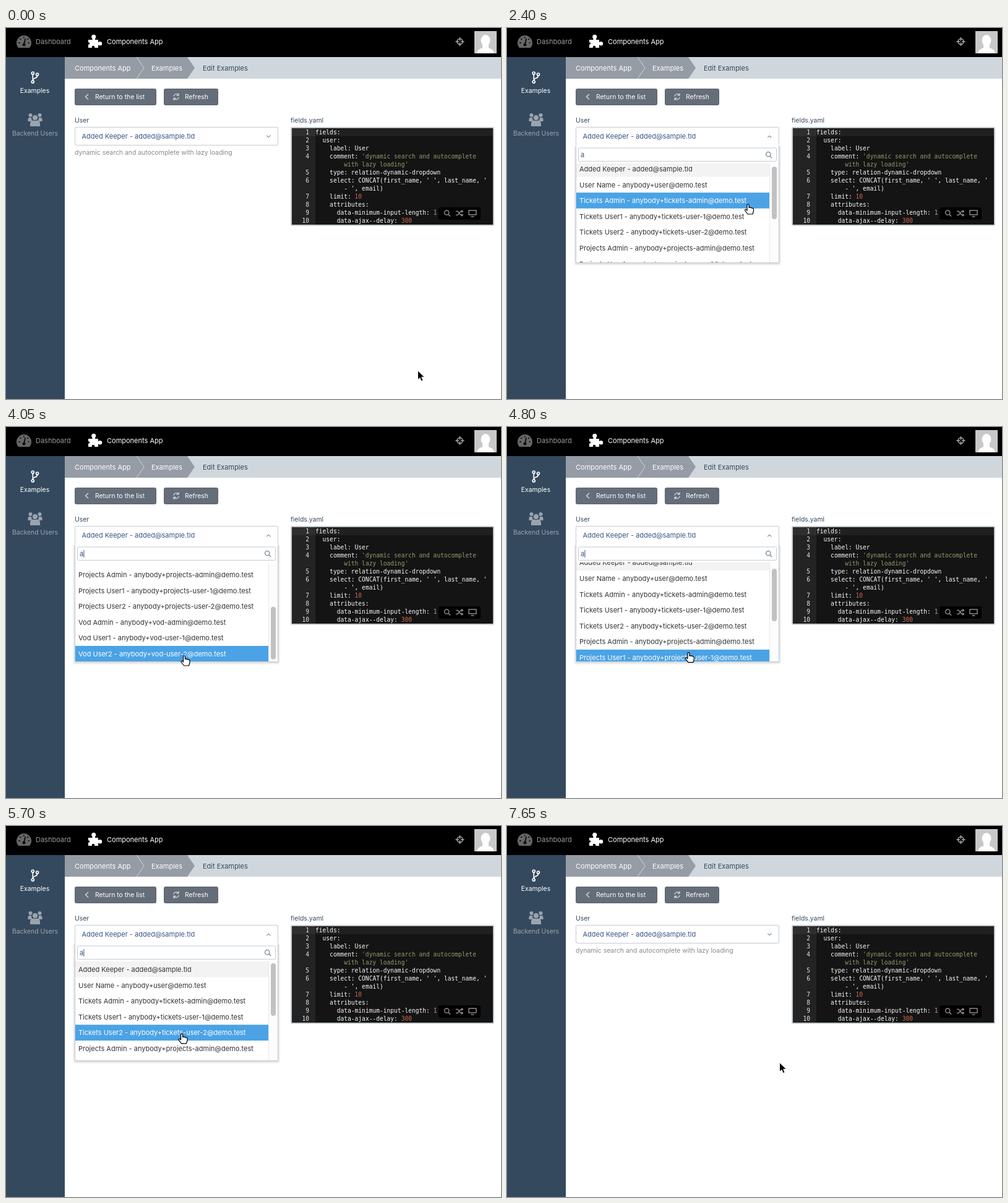
An HTML page for the animation above (7.8 s loop, 800 by 600 pixels).

```html
<!DOCTYPE html>
<html lang="en">
<head>
<meta charset="utf-8">
<title>Dynamic dropdown</title>
<style>
  html, body { margin: 0; width: 100%; height: 100%; overflow: hidden; background: #fff; }
  svg { display: block; font: 11px Inter, "Open Sans", sans-serif; }
  text { white-space: pre; }
  .small { font-size: 10.4px; }
  .code { font: 9.6px "DejaVu Sans Mono", monospace; fill: #f8f8f8; }
  .line { fill: none; stroke-linecap: round; stroke-linejoin: round; }
</style>
</head>
<body>
<svg width="800" height="600" viewBox="0 0 800 600">
  <defs>
    <clipPath id="codeClip"><rect x="462" y="162" width="325" height="156"/></clipPath>
    <clipPath id="listClip"><rect x="112" y="219" width="327" height="160"/></clipPath>
    <clipPath id="avatarClip"><rect x="757" y="5" width="36" height="36"/></clipPath>
    <g id="lens" class="line"><circle r="3.6" cx="-.8" cy="-.8"/><path d="M2 2 4.6 4.6"/></g>
    <path id="arrow" d="M0 0V15L3.4 11.8 5.8 17.2 8.6 16 6.2 10.8H11Z" fill="#000" stroke="#fff" stroke-linejoin="round"/>
    <g id="denied">
      <circle cx="9.5" cy="21" r="8" fill="#fff" stroke="#777" stroke-width="3.6"/>
      <path d="M4.5 16 14.5 26" stroke="#777" stroke-width="3.4"/>
      <circle cx="9.5" cy="21" r="8" fill="none" stroke="#ddd" stroke-width="1.6"/>
      <path d="M4 15.5 15 26.5" stroke="#ddd" stroke-width="1.5"/>
    </g>
    <path id="hand" d="M-1.5 1.5Q0-.5 1.5 1.5V6Q3 4.8 4.3 6.3 5.8 5.5 7 7 9 6.5 9 9V11.5L7.5 16.5H-.5L-5 10.5Q-5 8-2.8 9.2L-1.5 10.5Z" fill="#fff" stroke="#000" stroke-width="1.2" stroke-linejoin="round"/>
  </defs>

  <!-- header -->
  <rect width="800" height="47"/>
  <path d="M20 32A12 12 0 1 1 38 32Z" fill="#666"/>
  <path class="line" d="M29 27 31 18M21 24h1M23 18h.5M28.5 15.5h.5M35 18h.5M36.5 24h.5" stroke="#111" stroke-width="2"/>
  <circle cx="29" cy="27" r="2.5" fill="#111"/>
  <text x="48" y="26" fill="#999">Dashboard</text>
  <path d="M133 19H139.500V16H144V19H149V23H152V27H149V32H133Z" fill="#fff"/>
  <g fill="#fff"><circle cx="141.7" cy="14.3" r="3.5"/><circle cx="152" cy="25.3" r="3.2"/></g>
  <circle cx="141" cy="31" r="2.3"/><circle cx="133.5" cy="25" r="1.8"/>
  <text x="163" y="26" fill="#fff">Components App</text>
  <g class="line" stroke="#aaa" stroke-width="1.5"><circle cx="733.5" cy="22" r="4.5"/><path d="M733.5 15.5V20M733.5 24V28.5M727 22H731.5M735.5 22H740"/></g>
  <g clip-path="url(#avatarClip)">
    <rect x="757" y="5" width="36" height="36" fill="#c8c8c8"/>
    <ellipse cx="775" cy="20" rx="7.5" ry="9" fill="#fff"/>
    <path d="M761 42Q761 34.500 770 32.500V27H780V32.500Q789 34.500 789 42Z" fill="#fff"/>
  </g>

  <!-- sidebar -->
  <rect y="47" width="95" height="553" fill="#35495e"/>
  <g class="line" stroke="#fff" stroke-width="1.7"><circle cx="43.300" cy="73" r="2"/><circle cx="43.300" cy="87" r="2"/><circle cx="50.500" cy="75" r="2"/><path d="M43.300 75V85M50.500 77Q50.500 80.500 46 81.500 43.500 82.500 43.300 85"/></g>
  <text class="small" x="46.5" y="105" fill="#fff" text-anchor="middle">Examples</text>
  <g fill="#9aa4af">
    <circle cx="39.5" cy="141" r="3"/><circle cx="54.5" cy="141" r="3"/>
    <path d="M35.500 151V147Q36 144 41 145L42 151ZM58.500 151V147Q58 144 53 145L52 151Z"/>
    <path d="M39 159V154Q40 149 44 149.500H50Q54 149 55 154V159Z"/>
    <circle cx="47" cy="145" r="4.6" stroke="#35495e"/>
  </g>
  <text class="small" x="47" y="174" fill="#9aa4af" text-anchor="middle">Backend Users</text>

  <!-- breadcrumb -->
  <rect x="95" y="47" width="705" height="35" fill="#d0d7dc"/>
  <path d="M95 47H293L305 64.500 293 82H95Z" fill="#959ca6"/>
  <path d="M211 47 223 64.500 211 82" fill="none" stroke="#d0d7dc"/>
  <g fill="#fff"><text x="111" y="69">Components App</text><text x="235" y="69">Examples</text></g>
  <text x="318" y="69" fill="#34495e">Edit Examples</text>

  <!-- buttons -->
  <g fill="#656d79" stroke="#5b636e"><rect x="111.5" y="98.500" width="131" height="26" rx="2"/><rect x="255.5" y="98.500" width="87" height="26" rx="2"/></g>
  <g class="line" stroke="#c9cdd2" stroke-width="1.7"><path d="M132.500 107.500 128.500 111.200 132.500 115"/><path d="M271 110A4.200 4.200 0 0 1 278.500 108.500M279 106V109H276M279 112.500A4.200 4.200 0 0 1 271.500 114M271 116.500V113.500H274" stroke-width="1.4"/></g>
  <g class="small" fill="#fff"><text x="144" y="115">Return to the list</text><text x="289" y="115">Refresh</text></g>

  <!-- form -->
  <g class="small" fill="#34495e"><text x="111" y="153">User</text><text x="460" y="153">fields.yaml</text></g>
  <text class="small" x="111" y="205" fill="#888">dynamic search and autocomplete with lazy loading</text>
  <rect x="461" y="161" width="327" height="158" rx="1.5" fill="#141414" stroke="#c3ccd2" stroke-width="2"/>
  <g clip-path="url(#codeClip)">
    <rect x="462" y="162" width="38" height="157" fill="#232323"/>
    <rect x="462" y="162" width="326" height="13" fill="#fff" opacity=".05"/>
    <g id="code" class="code"></g>
  </g>
  <rect x="699" y="290" width="68" height="20" rx="3" fill="#000"/>
  <g stroke="#8a8a8a" stroke-width="1.5"><use href="#lens" x="713" y="299.5"/>
    <path class="line" d="M727.5 296.5H730L735 302.5H738M727.5 302.5H730L735 296.5H738M736.5 295 738.5 296.5 736.5 298M736.5 301 738.5 302.5 736.5 304M748 295H760V302H748ZM752 305H756"/></g>

  <g id="live"></g>
</svg>
<script>
const el = id => document.getElementById(id);
const person = 'Added Keeper - added@sample.tld';
const mail = tag => `anybody+${tag}@demo.test`;
const users = [person, `User Name - ${mail('user')}`];
for (const team of ['Tickets', 'Projects', 'Vod'])
  for (const [role, tag] of [['Admin', 'admin'], ['User1', 'user-1'], ['User2', 'user-2']])
    users.push(`${team} ${role} - ${mail(team.toLowerCase() + '-' + tag)}`);

// Editor lines: number, indent in characters, text, optional coloured tail and its colour
const green = '#8f9d6a', red = '#cf6a4c';
const code = [
  [1, 0, 'fields:'], [2, 2, 'user:'], [3, 4, 'label: User'],
  [4, 4, 'comment: ', "'dynamic search and autocomplete", green],
  ['', 8, '', "with lazy loading'", green],
  [5, 4, 'type: relation-dynamic-dropdown'],
  [6, 4, "select: CONCAT(first_name, ' ', last_name, '"],
  ['', 8, "- ', email)"], [7, 4, 'limit: ', '10', red], [8, 4, 'attributes:'],
  [9, 6, 'data-minimum-input-length: ', '1', '#a0a0a0'],
  [10, 6, 'data-ajax--delay: ', '300', red]
];
el('code').innerHTML = code.map(([n, indent, str, tail = '', color = ''], i) => {
  const y = 172 + 13 * i;
  return `<text x="490" y="${y}" text-anchor="end" fill="#e2e2e2">${n}</text>
    <text x="${500 + indent * 5.78}" y="${y}">${str}<tspan fill="${color}">${tail}</tspan></text>`;
}).join('');

const LOOP = 7800, STEP = 150, ROW = 25.6, TOP = 219, VIEW = 160;
const pointer = [
  [0, 665.5, 554], [150, 545, 375], [300, 400, 178], [750, 400, 178], [1200, 398, 225],
  [1800, 398, 225], [2400, 389.5, 284.5], [3300, 305, 375], [4050, 288, 369.5], [4650, 292, 366],
  [5250, 301, 354.5], [5550, 301, 354.5], [6150, 192.5, 231.5], [6600, 192.5, 231.5],
  [6900, 196, 236], [7050, 196, 236], [7650, 440.5, 382.5], [LOOP, 440.5, 382.5]
];
const scrolling = [[0, 0], [2250, 0], [2400, 4], [3300, 121], [4200, 121], [4950, 0], [LOOP, 0]];

function at(keys, t) {
  const i = keys.findIndex(k => k[0] > t), a = keys[i - 1], b = keys[i];
  const p = (t - a[0]) / (b[0] - a[0]), ease = p * p * (3 - 2 * p);
  return a.slice(1).map((v, j) => v + (b[j + 1] - v) * ease);
}
const rect = (x, y, w, h, more) => `<rect x="${x}" y="${y}" width="${w}" height="${h}" ${more}/>`;
const text = (x, y, str, fill) => `<text x="${x}" y="${y}" fill="${fill}">${str}</text>`;

function selectBox(open) {
  const chevron = open ? 'M421.5 177 424.2 174.2 427 177' : 'M421.5 174 424.2 176.8 427 174';
  return rect(111.5, 160.5, 328, 29, 'rx="1.5" fill="#fff" stroke="#c3ccd6"')
    + text(122.5, 179, person, '#385487')
    + `<path class="line" d="${chevron}" stroke="#385487"/>`;
}

function listState(t) {
  if (t < 1200) return { note: 'Please enter 1 or more characters', rows: [] };
  if (t < 1800) return { note: 'Searching...', rows: [] };
  if (t < 6300) return { rows: users };
  if (t < 6600) return { note: 'Searching...', rows: users };
  return { rows: users.filter(u => /ad.* - /i.test(u)) };
}

function dropdown(t, y) {
  const { note, rows } = listState(t);
  const all = note ? [note, ...rows] : rows;
  const full = all.length * ROW, h = Math.min(full, VIEW), bottom = Math.round(TOP + h);
  const [scroll] = at(scrolling, t);
  const bar = full > VIEW, width = bar ? 312 : 327;
  const hot = note ? 1 : Math.max(0, Math.floor((y - TOP + scroll) / ROW));

  let out = rect(108, 190, 335, bottom - 185, 'rx="4" fill="#000" opacity=".05"')
    + rect(110, 190, 331, bottom - 187, 'rx="3" fill="#000" opacity=".08"')
    + rect(111.5, 189, 328, bottom - 188.5, 'rx="2" fill="#fff" stroke="#c3ccd6"')
    + rect(112, 187, 327, 6, 'fill="#fff"')
    + rect(115.5, 194, 320, 21.5, 'rx="2" fill="#fff" stroke="#c3ccd6"')
    + '<use href="#lens" x="423" y="205" stroke="#8496a0" stroke-width="1.5"/>';
  const query = t < 1200 ? '' : t < 6150 ? 'a' : 'ad';
  out += text(119, 209, query, '#385487');
  if ((t + 300) % 1000 < 500) out += rect(119 + 6.4 * query.length, 199, 1, 12, 'fill="#385487"');

  out += '<g clip-path="url(#listClip)">';
  all.forEach((str, i) => {
    const top = TOP + i * ROW - scroll, isNote = note && !i, isHot = !isNote && i === hot;
    const fill = isHot ? '#4ba3e5' : str === person ? '#f3f3f3' : '';
    if (fill) out += rect(112, top, width, ROW, `fill="${fill}"`);
    out += text(117, top + 17, str, isNote ? '#999' : isHot ? '#fff' : '#333');
  });
  if (bar) {
    const thumb = 154 * VIEW / full - 2.5;
    out += rect(424, TOP, 15, VIEW, 'fill="#fcfcfc"') + rect(424, TOP, 1, VIEW, 'fill="#e9e9e9"')
      + rect(428, 222 + scroll / (full - VIEW) * (154 - thumb), 8, thumb, 'rx="4" fill="#c1c1c1"');
  }
  return out + '</g>';
}

function cursor(t, x, y, open) {
  const { note } = listState(t), inList = open && y > TOP;
  const shapes = !inList ? ['arrow'] : note ? ['denied', 'arrow'] : ['hand'];
  return shapes.map(id => `<use href="#${id}" x="${x}" y="${y}"/>`).join('');
}

let shown = -1;
function frame(now) {
  const t = Math.floor(now % LOOP / STEP) * STEP;
  if (t !== shown) {
    shown = t;
    const [x, y] = at(pointer, t), open = t >= 600 && t < 7050;
    el('live').innerHTML = selectBox(open) + (open ? dropdown(t, y) : '') + cursor(t, x, y, open);
  }
  requestAnimationFrame(frame);
}
frame(performance.now());
</script>
</body>
</html>
```
